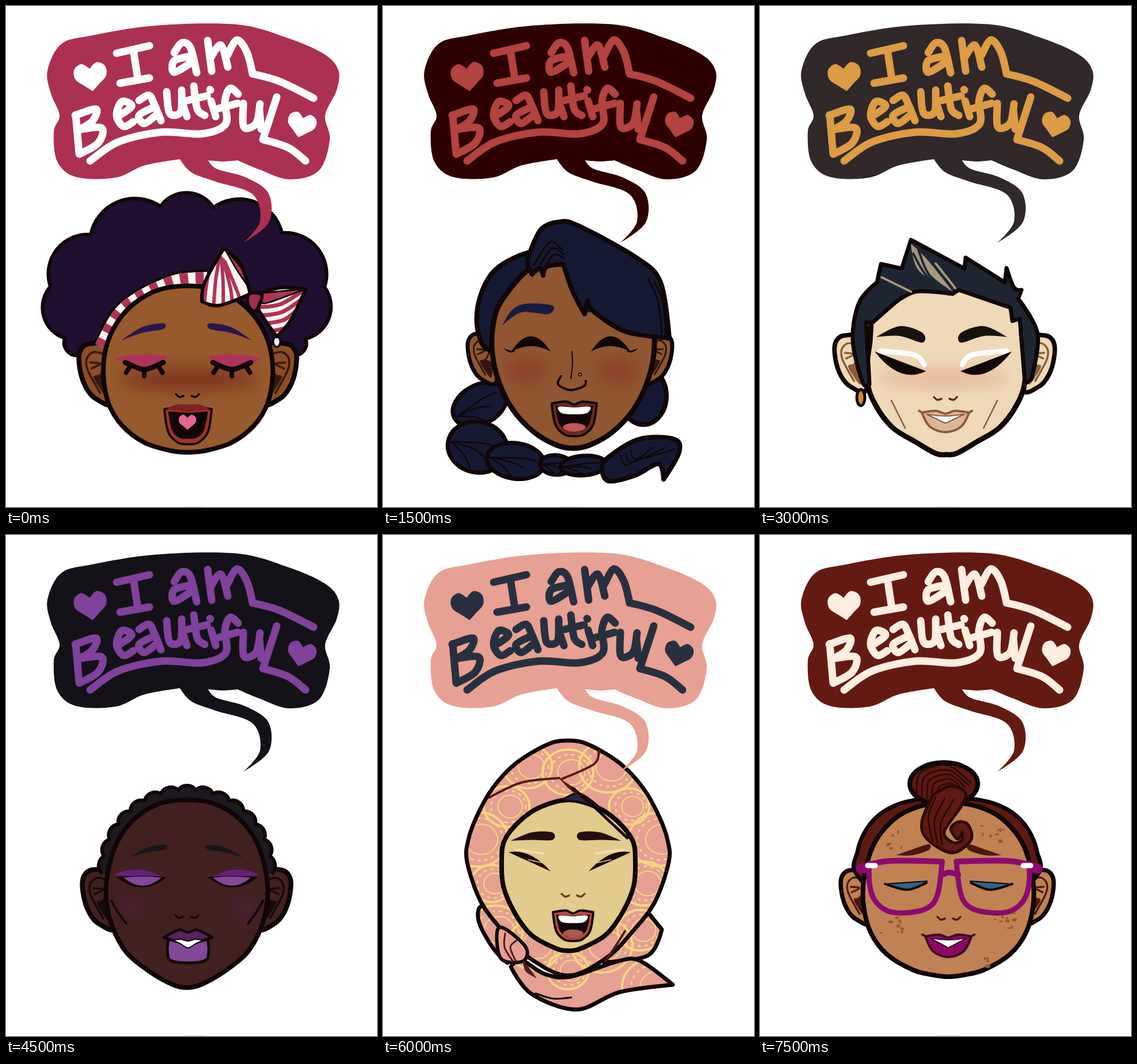
An HTML page for the animation above (8000 ms loop, 644 by 870 pixels).

```html
<!DOCTYPE html>
<html lang="en">
<head>
<meta charset="utf-8">
<title>I am beautiful</title>
<style>
html, body { margin: 0; width: 100%; height: 100%; overflow: hidden; background: #fff; }
svg { display: block; width: 644px; height: 870px; }
.soft { filter: blur(13px); }
</style>
</head>
<body>
<svg id="stage" viewBox="0 0 644 870" role="img" aria-label="I am Beautiful"></svg>
<script>
const INK = '#100608';
const LOOP = 8000, HOLD = 1500;

const loop = (n, draw) => Array.from({ length: n }, (_, i) => draw(i)).join('');

// Smooth curve through "x,y" points; a trailing "!" marks a sharp corner.
function curve(text, closed) {
  const pts = text.trim().split(/\s+/).map(t => {
    const [x, y] = t.replace('!', '').split(',').map(Number);
    return { x, y, sharp: t.endsWith('!') };
  });
  const n = pts.length;
  const at = i => closed ? pts[(i + n) % n] : pts[Math.max(0, Math.min(n - 1, i))];
  const handle = (i, dir) => {
    const p = at(i), k = p.sharp ? 0 : dir / 6;
    return `${p.x + (at(i + 1).x - at(i - 1).x) * k} ${p.y + (at(i + 1).y - at(i - 1).y) * k}`;
  };
  let d = `M${pts[0].x} ${pts[0].y}`;
  for (let i = 0; i < (closed ? n : n - 1); i++) {
    d += `C${handle(i, 1)} ${handle(i + 1, -1)} ${at(i + 1).x} ${at(i + 1).y}`;
  }
  return d;
}

// Full outline from its left half, listed from top centre to bottom centre.
function sym(axis, half) {
  const left = half.trim().split(/\s+/);
  const right = left.slice(1, -1).reverse().map(p => p.replace(/^[^,]+/, x => 2 * axis - x));
  return [...left, ...right].join(' ');
}

const path = (d, color, w = 0, ink = INK) =>
  `<path d="${d}" fill="${color}" stroke="${w ? ink : 'none'}" stroke-width="${w}" stroke-linejoin="round"/>`;
const blob = (pts, ...paint) => path(curve(pts, true) + 'Z', ...paint);
const line = (pts, color, w, extra = 'stroke-linecap="round"') =>
  `<path d="${curve(pts)}" fill="none" stroke="${color}" stroke-width="${w}" stroke-linejoin="round" ${extra}/>`;
const lines = (list, color, w) => list.map(p => line(p, color, w)).join('');
const oval = (x, y, rx, ry, color, extra = '') =>
  `<ellipse cx="${x}" cy="${y}" rx="${rx}" ry="${ry}" fill="${color}" ${extra}/>`;
const outline = w => `stroke="${INK}" stroke-width="${w}"`;
const place = (x, y, transform, art) => `<g transform="translate(${x} ${y}) ${transform}">${art}</g>`;
const both = (axis, art) => art + place(2 * axis, 0, 'scale(-1 1)', art);
const blush = (x, y, rx, ry, color) => oval(x, y, rx, ry, color, 'class="soft" opacity=".6"');

let clips = 0;
function printed(pts, base, art, w) {
  const id = 'clip' + clips++;
  return blob(pts, base) + `<clipPath id="${id}"><path d="${curve(pts, true)}Z"/></clipPath>` +
    `<g clip-path="url(#${id})">${art}</g>` + blob(pts, 'none', w);
}

// Round bumps between successive [x, y] valleys.
const lobes = (valleys, roundness) => 'M' + valleys.map(([x, y], i) => {
  if (!i) return `${x} ${y}`;
  const r = roundness * Math.hypot(x - valleys[i - 1][0], y - valleys[i - 1][1]);
  return `A${r} ${r} 0 0 1 ${x} ${y}`;
}).join('');

// Almond between two corners, bowed by "up" above and "down" below.
function almond(x0, y0, x1, y1, up, down, color) {
  const mx = (x0 + x1) / 2, my = (y0 + y1) / 2;
  return path(`M${x0} ${y0}Q${mx} ${my - up} ${x1} ${y1}Q${mx} ${my + down} ${x0} ${y0}Z`, color);
}

function brow(x0, y0, x1, y1, lift, w, color) {
  const mx = (x0 + x1) / 2, my = (y0 + y1) / 2 - lift, h = w / 2;
  return blob(`${x0},${y0}! ${mx},${my - h} ${x1},${y1 - h} ${x1},${y1 + h} ${mx},${my + h}`, color);
}

const heart = (x, y, size, turn, color) =>
  place(x, y, `rotate(${turn}) scale(${size})`, blob(sym(0, '0,-13! -13,-23 -27,-15 -27,2 -13,15 0,26!'), color));

const nose = (x, y, color) => both(x, line(`${x - 20},${y - 3} ${x - 14},${y + 2} ${x - 7},${y}`, color, 3.5));

function ears(axis, x, y, size, skin, shade) {
  return both(axis, place(x, y, `scale(${size})`,
    blob('60,12 22,3 5,16 5,45 15,75 32,94 60,98', skin, 8) +
    blob('28,56 50,60 50,90 36,74', shade) +
    lines(['44,20 27,17 16,28 18,47 38,84', '22,34 38,36 24,44', '30,60 41,51 46,38'], shade, 3.5)));
}

function openMouth(x, y, w, h, lip, filling) {
  const l = x - w / 2, half = k => x - w * k;
  return blob(sym(x, `${x},${y + 2} ${half(.18)},${y - 3} ${l},${y}! ${half(.42)},${y + h * .65} ${half(.22)},${y + h * .95} ${x},${y + h}`), lip, 4) +
    blob(sym(x, `${x},${y + 6} ${half(.42)},${y + 4}! ${half(.34)},${y + h * .6} ${half(.18)},${y + h * .82} ${x},${y + h * .84}`), INK) +
    filling;
}
const teethAndTongue = (x, y, w, h, tongue) =>
  oval(x, y + h * .73, w * .25, h * .13, tongue) +
  blob(sym(x, `${x},${y + 7} ${x - w * .35},${y + 6} ${x - w * .28},${y + 17} ${x},${y + 19}`), '#fff');

function smile(x, y, w, h, lip, ink) {
  const l = x - w / 2;
  return blob(sym(x, `${x},${y + 2} ${x - w * .2},${y - 3} ${l},${y}! ${x - w * .33},${y + h * .72} ${x},${y + h}`), lip, 4, ink) +
    blob(sym(x, `${x},${y + 6} ${x - w * .4},${y + 3}! ${x},${y + h * .55}!`), '#fff', 2, ink) +
    both(x, line(`${l - 5},${y - 3} ${l + 2},${y + 1}`, ink, 4));
}

const BUBBLE = `72,112 96,66 150,51 260,34 400,32 490,56 553,84 577,112 574,146 554,190 562,232 543,286 492,301
  440,284 402,268! 376,270 351,268! 366,283 417,298 456,326 456,376 412,411! 441,374 428,327 364,305 322,289
  302,266! 240,277 190,298 122,297 89,270 83,218 93,190 78,152`;

const LETTERS = [
  '192,82 249,69', '221,76 229,128', '198,134 249,125',
  '292,81 305,64 320,72 331,116', '321,87 292,95 292,115 322,98',
  '350,60 357,113', '355,90 373,68 385,106', '384,86 401,59 418,80 428,118! 475,131 534,160',
  '121,189 127,257', '120,190 156,179 150,200 126,215! 166,212 160,238 128,257',
  '194,192 218,174 201,166 192,190 204,209 221,201',
  '231,164 248,155 258,172 269,199', '256,176 231,190 240,204 260,190',
  '279,149 284,186 303,184 305,146', '305,165 314,192',
  '326,139 332,179 345,190', '315,164 349,156', '356,165 364,192', '354,145 355,146',
  '403,153 389,143 380,165 381,205 340,222 270,219 195,236 146,269', '369,178 402,169',
  '412,169 413,210 434,204 441,170', '440,182 443,214',
  '470,158 446,232! 490,246 520,269'
];

const bubble = (back, front) => blob(BUBBLE, back) + lines(LETTERS, front, 13) +
  heart(147, 122, 1, -8, front) + heart(513, 206, .87, 14, front);

function afro() {
  const pink = '#ad3457', pale = '#fff4f3', band = '164,592 205,525 285,480 350,472';
  const hair = [[125, 607], [102, 577], [77, 487], [147, 397], [268, 348], [360, 350], [479, 394], [553, 488], [520, 578], [500, 607]];
  const fan = (x, y, cx, cy, spread) => loop(5, i =>
    line(`${x + i * 3},${y + i * 3} ${cx + i * spread},${cy + i * 8} ${cx + i * spread * 1.3 - 8},${cy + 60}`, pink, 6));
  const lash = loop(3, i => {
    const t = .14 + i * .36, x = 207 + 66 * t, y = 619 + 48 * t * (1 - t);
    return line(`${x},${y} ${x + (t - .5) * 22},${y + 12}`, INK, 8);
  });
  return path(lobes(hair, .6), '#200f31', 6) + ears(315.5, 123, 583, 1.06, '#8a4f29', '#3a180d') +
    line(band, INK, 29, '') + line(band, pale, 21, '') + line(band, pink, 21, 'stroke-dasharray="14 13"') +
    oval(470, 583, 6, 9, pale, outline(3)) +
    blob(sym(316, '316,486 265,493 222,517 192,551 174,592 169,640 178,690 201,728 240,758 285,772 316,775'), '#965a2d', 8) +
    blush(318, 648, 118, 18, '#701c12') +
    both(313.5, brow(200, 581, 273, 556, 6, 10, '#2a174b')) +
    both(316, almond(189, 612, 283, 609, 12, 34, pink) + line('207,619 240,631 273,619', INK, 9) + lash) +
    nose(315, 677, INK) +
    openMouth(316, 700, 82, 61, '#a43027', blob(sym(316, '316,692 296,692 278,700! 316,704'), '#7e211d') + heart(315, 722, .53, 0, '#e4668f')) +
    printed('378,421! 345,480 340,513! 370,520 424,500! 407,448', pale,
      fan(368, 432, 351, 468, 13) + blob('378,418! 421,472 426,495! 400,457', pink, 3), 6) +
    place(440, 499, '', printed('0,0! 38,-10 80,-7! 54,47 30,75! -3,25', pale,
      loop(4, i => line(`-2,${24 + i * 15} ${36 + i * 2},${19 + i * 14} ${78 - i * 7},${-6 + i * 18}`, pink, 7)) +
      blob('-2,0! 82,-8! 30,11! 5,17', pink, 3), 6)) +
    blob('422,500 444,502 433,530 420,519', '#a02c4e', 6);
}

function braid() {
  const skin = '#8f5630', hair = '#161933';
  const beads = [[168, 692, 50, 34, -28], [164, 766, 52, 44, 12], [230, 790, 50, 31, 8], [300, 797, 28, 17, 4], [348, 798, 40, 17, -4]];
  const bead = ([x, y, rx, ry, turn]) => place(x, y, `rotate(${turn})`, oval(0, 0, rx, ry, hair, outline(7)) +
    loop(3, i => line(`${-rx * .9},0 ${rx * (i * .3 - .4)},${ry * (.4 - i * .3)} ${rx * (i * .4 - .1)},${ry * (.85 - i * .5)}`, INK, 2.6)));
  return oval(452, 677, 40, 50, hair, outline(8)) + beads.map(bead).join('') +
    blob('380,803 392,783 445,752 505,752 514,775 487,822! 478,795 438,815 392,825', hair, 8) +
    loop(3, i => line(`${412 + i * 9},${780 - i * 4} ${424 + i * 9},${797 - i * 5} ${470 + i * 18},${766 + i * 2}`, INK, 2.6)) +
    ears(324.5, 144, 566, .88, skin, '#35160e') +
    blob('165,566 167,510 196,457 258,427 300,440 280,600 190,600', hair, 8) +
    blob(sym(330, '330,450 262,452 207,510 191,555 190,605 202,655 226,702 262,740 300,762 330,768'), skin, 9) +
    both(328, blush(249, 634, 34, 18, '#8d2f2a')) +
    blob('207,555! 223,529 248,517 294,520 287,535 240,532', '#161d40') + oval(359, 525, 11, 7, '#161d40') +
    blob(`256,425 275,387 305,375 338,381 440,437 482,480 497,577! 420,565 365,530 355,512! 350,535! 329,495
      313,448! 284,453 278,468! 272,455 259,466! 251,446`, hair, 8) +
    loop(3, i => line(`${312 + i},${424 + i * 7} ${290 + i * 3},${410 + i * 11} ${262 + i * 8},${450 + i * 5}`, INK, 3)) +
    loop(2, i => line(`${461 + i * 10},${475 + i * 4} ${478 + i * 8},515 ${484 + i * 7},570`, INK, 3)) +
    both(326, almond(209, 594, 230, 599, -3, 10, INK) + almond(222, 601, 291, 600, 54, -20, INK)) +
    line('328,600 329,622 326,647', INK, 2) + line('309,643 304,657 325,667 349,660 352,651', INK, 4) +
    oval(342, 640, 2.5, 2.5, '#b88a72', outline(1.5)) +
    openMouth(332, 690, 78, 57, '#6e291d', teethAndTongue(332, 690, 78, 57, '#c25755'));
}

function spiky() {
  const hair = '#1f2533', shade = '#8a5a38', blond = '#a6987c';
  return ears(320.5, 126, 569, .98, '#efd8b6', shade) + oval(175, 680, 7, 14, '#d28b2d', outline(5)) +
    blob(sym(323, '323,470 210,510 190,590 186,650 200,692 230,732 270,757 305,777 323,779'), '#efd8b6', 9) +
    blush(318, 645, 115, 16, '#dfa588') +
    blob(`178,653 161,580 172,515 203,480! 210,448! 246,456! 262,406! 355,456! 357,437! 425,480! 428,455! 441,489
      454,493! 448,508! 482,570 471,648! 460,656! 451,543! 438,547! 435,524! 345,493! 334,500! 270,496 230,519!
      195,550! 184,549! 190,657!`, hair, 7) +
    blob('262,413! 290,440 334,495! 276,460', blond) +
    loop(2, i => line(`${266 + i * 9},${430 - i * 6} ${287 + i * 6},466 ${318 + i * 8},493`, hair, 4)) +
    lines(['305,447 339,490', '211,471 262,496'], blond, 4) +
    both(315.5, brow(202, 575, 282, 576, 11, 17, '#17110f')) +
    both(318, line('208,599 268,606 285,623', '#fff', 9) + almond(199, 600, 288, 634, 0, 40, INK)) +
    nose(322, 682, '#5b2b17') + both(320, line('228,685 252,733', shade, 2.5)) +
    smile(322, 706, 82, 34, '#dfb59a', shade);
}

function cropped() {
  const lilac = '#84479c', shade = '#180a0b', bumps = 15;
  const hair = Array.from({ length: bumps + 1 }, (_, i) => {
    const a = Math.PI * i / bumps;
    return [314 - 147 * Math.cos(a), 588 - 146 * Math.sin(a)];
  });
  return ears(313.5, 129, 578, 1.04, '#422120', shade) + path(lobes(hair, .62), '#1d1920', 6) +
    blob(sym(314, '314,460 268,466 225,491 193,533 177,585 174,632 185,681 210,726 252,760 290,781 314,786'), '#422120', 8) +
    both(312, blush(214, 648, 22, 20, '#552145')) +
    both(313, brow(214, 560, 276, 542, 4, 8, '#18171c')) +
    both(314.5, almond(188, 590, 272, 594, 22, 4, '#64217a') + almond(192, 594, 279, 594, 4, 36, INK) +
      almond(204, 595, 270, 595, 4, 28, lilac) + line('183,635 193,653 209,675', shade, 4)) +
    nose(314, 663, shade) +
    blob(sym(316, '316,708 282,702! 280,722 286,739 316,743'), lilac, 5) +
    blob(sym(316, '316,690 300,686 274,699! 294,705 316,711'), '#59215f', 4.5) +
    blob(sym(316, '316,705 303,702 290,704! 303,710 316,717'), '#fff', 2);
}

function hijab() {
  const cloth = '#e5a091', gold = '#f6d681', wine = '#571819';
  const rosette = (x, y, r) => loop(3, i =>
    oval(x + i * 3, y, r * (1 - i * .23), r * (.9 - i * .2), 'none', `stroke="${gold}" stroke-width="${4 - i}" ${i == 1 ? 'stroke-dasharray="3 9" stroke-linecap="round"' : ''}`));
  const print = loop(14, i => {
    const a = i * Math.PI / 7, reach = 1 + .18 * (i % 2);
    return rosette(321 + 136 * reach * Math.sin(a), 570 - 158 * reach * Math.cos(a), 44 + 9 * Math.sin(i * 2.4));
  }) + rosette(470, 785, 55);
  const cover = (pts, w = 7) => printed(pts, cloth, print, w);
  return cover('458,653! 484,685! 460,730 384,742! 420,691') + cover('174,645 166,670 190,716 216,743! 252,716 222,690') +
    cover(sym(321, '321,357 285,364 230,397 190,440 163,488 148,530 146,568 170,637 210,690 255,735 321,765')) +
    cover('222,750! 240,738 280,762 325,767 405,741 445,739 503,781! 410,794 336,824 258,797') +
    blob('198,689 212,684 248,716 243,740 205,736', cloth, 6) +
    loop(2, i => line(`${212 + i * 20},${692 + i * 12} ${211 + i * 10},716 ${226 + i * 5},741`, wine, 3)) +
    blob('243,737! 267,770! 247,757', wine) + line('265,796 295,805 327,803', INK, 3) +
    blob(sym(322, '322,460 272,473 237,497 211,530 206,565 209,610 228,655 257,694 298,717 322,722'), '#e3ca8d', 8) +
    blob('308,463! 340,449 376,474! 335,463', '#242a3b', 4) +
    lines(['184,456 240,430 306,422', '310,424 366,398 375,374', '420,688 405,712 386,740'], wine, 4) +
    blob('304,421! 333,440! 378,476! 334,450', wine) + line('330,440 362,468 424,526', INK, 5) +
    both(317.5, brow(222, 531, 294, 523, 4, 13, '#260f0d')) +
    both(324, line('230,546 278,553', '#f4dfa5', 4) + almond(218, 551, 291, 584, 24, 0, '#1b0b0a') +
      line('252,564 276,569', '#e3ca8d', 1.5)) +
    nose(330, 626, '#6e3a22') +
    openMouth(330, 655, 70, 50, '#b64a3b', teethAndTongue(330, 655, 70, 50, '#a55c50'));
}

function glasses() {
  const skin = '#c08253', hair = '#5c1a12', frame = '#8c0a70', shade = '#49180f', strand = '#2c0907';
  let seed = 7;
  const random = () => (seed = seed * 16807 % 2147483647) / 2147483647;
  const freckles = (x, y, n) => loop(n, () =>
    oval(x + (random() - .5) * 40, y + (random() - .5) * 30, 1.5 + random() * 3, 1 + random() * 2.4, '#99592f'));
  return ears(325, 137, 579, .94, skin, shade) +
    blob(sym(325, '325,455 255,463 212,482 184,512 169,550 168,590 240,650 325,650'), hair, 7) +
    blob(sym(327, '327,465 285,469 243,486 211,516 192,550 180,600 180,645 192,690 220,728 265,755 300,764 327,767'), skin, 8) +
    freckles(230, 678, 11) + freckles(425, 670, 11) + freckles(402, 520, 8) + freckles(240, 530, 6) + freckles(380, 738, 4) +
    oval(319, 432, 59, 37, hair, outline(8)) +
    loop(5, i => line(`${272 + i * 9},${456 + i} ${278 + i * 8},${414 + i * 6} ${325 + i * 2},${400 + i * 8} ${366 - i * 5},${430 + i * 4}`, strand, 2.6)) +
    blob(`300,452! 281,498 290,528 333,552 366,530 362,504 345,498 331,510 343,528 351,516! 350,530 335,534
      320,515 350,470 356,447 330,436`, hair, 5, strand) +
    loop(3, i => line(`${305 + i * 16},${455 + i * 2} ${292 + i * 11},${490 + i * 5} ${300 + i * 8},${532 + i * 3}`, strand, 2.6)) +
    both(327.5, brow(236, 556, 293, 542, -2, 10, shade)) +
    both(327.5, almond(217, 606, 290, 602, 3, 24, '#306580') + line('217,606 256,616 289,604', INK, 4) + line('220,606 290,601', INK, 2)) +
    both(328.5, line('190,570! 190,605 199,634 222,653 255,656 290,648 308,625 316,568!', frame, 9) +
      line('172,577 225,566 316,567', frame, 10) + line('174,580 184,579', frame, 15) + line('187,574 200,574', '#fff', 9)) +
    line('315,590 329,586 344,590', frame, 10) +
    nose(328, 666, shade) + smile(327, 697, 80, 36, '#8e0765', '#3b0b24');
}

const scenes = [
  [afro, '#ab3052', '#ffffff'], [braid, '#2d0100', '#b2433f'], [spiky, '#302829', '#dc9b45'],
  [cropped, '#151118', '#80429b'], [hijab, '#e6a192', '#28303f'], [glasses, '#641a10', '#feeee0']
];
const stage = document.getElementById('stage');
stage.innerHTML = scenes.map(([head, back, front], i) =>
  `<g class="scene" opacity="${i ? 0 : 1}">${head()}${bubble(back, front)}</g>`).join('') +
  '<path d="M306 869.5H346" stroke="#e4e4e4"/>';

stage.querySelectorAll('.scene').forEach((scene, i) => {
  const from = i * HOLD / LOOP, to = Math.min(1, from + HOLD / LOOP);
  const last = to < 1 ? 0 : 1;
  const steps = [[from, 1], [to, last], [1, last]];
  if (from > 0) steps.unshift([0, 0]);
  scene.animate(steps.map(([offset, opacity]) => ({ offset, opacity, easing: 'step-end' })),
    { duration: LOOP, iterations: Infinity, fill: 'both' });
});
</script>
</body>
</html>
```
